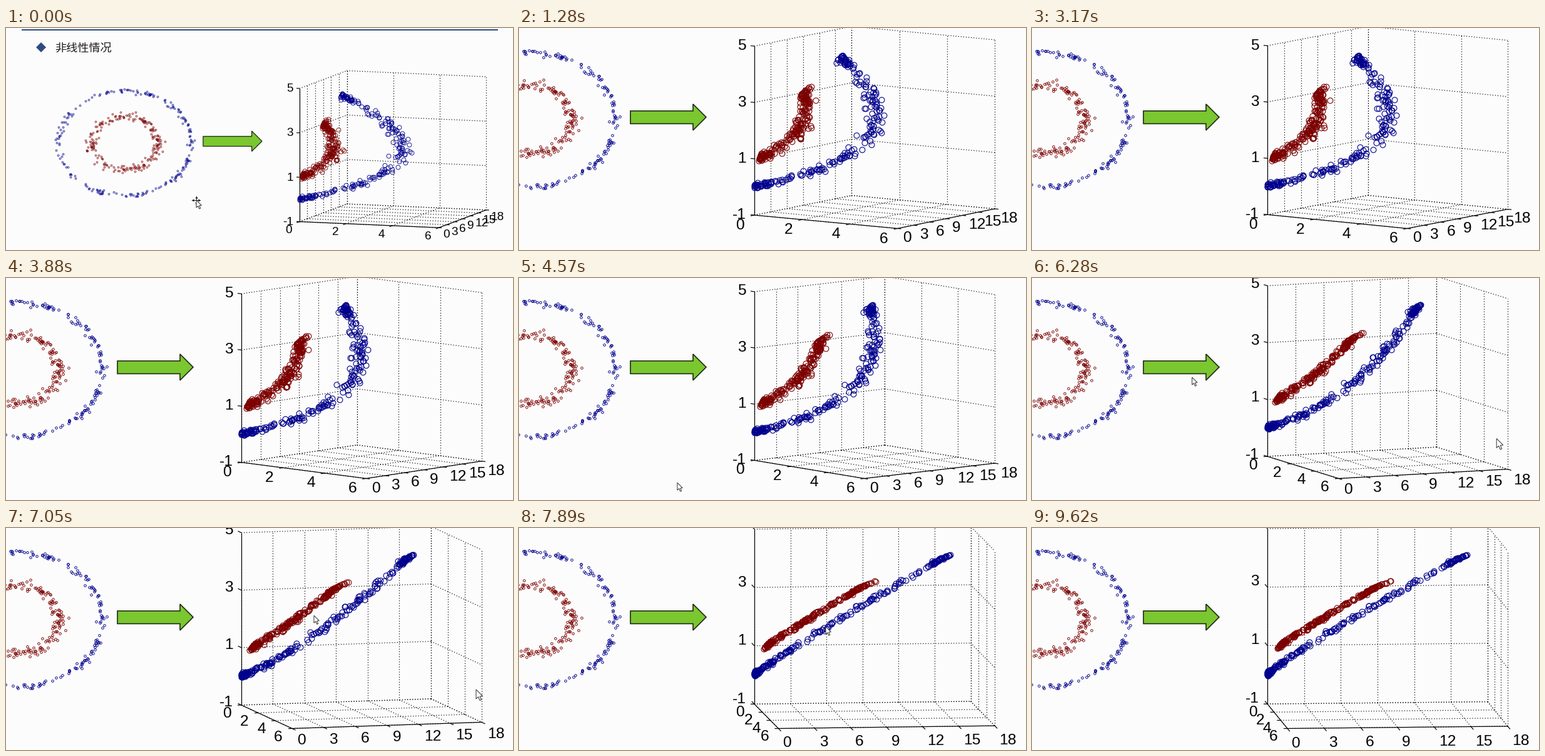
Animation of 810x356 px, one loop 9690 ms. Source, as a matplotlib script:

```python
import numpy as np
import matplotlib.pyplot as plt
from matplotlib.animation import FuncAnimation
from matplotlib.collections import LineCollection
from matplotlib.patches import Polygon
from matplotlib.transforms import Affine2D

W, H, DPI = 810, 356, 100
LOOP, STEP = 9690, 30
PX = 72 / DPI                      # points per pixel
WIDE = 1 / 1.287                   # camera scale before the zoom
FOCUS = np.array([792, 315.7])     # fixed point of the zoom
LEFT, SPAN = 376, 384              # plot box on the stage
BOTTOM, TALL = 321.5, 324
TILT = np.tan(np.radians(8))
NAVY, MAROON = "#00008c", "#7c0000"

fig = plt.figure(figsize=(W / DPI, H / DPI), dpi=DPI, facecolor="#fcfcfc")
ax = fig.add_axes([0, 0, 1, 1])
ax.set(xlim=(0, W), ylim=(H, 0))
ax.axis("off")

cam = Affine2D()
view = cam + ax.transData


def wide(points):
    """Scene position of points given on the stage before the zoom."""
    return FOCUS + (np.array(points) - FOCUS) / WIDE


# Heading
rule = wide([(26, 3), (785, 3)])
ax.plot(*rule.T, color="#2c4a7a", lw=2 * PX, transform=view)
diamond = wide([(48, 31), (56, 23), (64, 31), (56, 39)])
ax.add_patch(Polygon(diamond, fc="#2f4a80", ec="none", transform=view))
heading = ax.text(*wide((78, 31)), "非线性情况", family="Noto Sans CJK JP",
                  color="#201a1c", va="center_baseline", transform=view)

# Block arrow
arrow = Polygon([(178, 133), (278, 133), (278, 122), (299, 143), (278, 164),
                 (278, 153.5), (178, 153.5)], fc="#7ac730", ec="#1c2410",
                joinstyle="miter", transform=view)
ax.add_patch(arrow)


# Two noisy rings, lifted to (x², u², u)
def ring(rng, radius, noise, n):
    a = rng.uniform(0, 2 * np.pi, n)
    r = radius + rng.normal(0, noise, n)
    return r * np.cos(a), 2 + r * np.sin(a)


def markers(color, z):
    return ax.plot([], [], "o", mfc="none", mec=color, transform=view,
                   zorder=z)[0]


rng = np.random.default_rng(12)
groups = []
for radius, noise, color in ((1.98, .045, NAVY), (1, .085, MAROON)):
    x, u = ring(rng, radius, noise, 220)
    flat = markers(color, 3)
    flat.set_data(17 + 69 * x, 147 - 54.5 * (u - 2))
    groups.append((flat, markers(color, 5), np.array([x**2, u**2, u])))

# Plot box
grid = LineCollection([], colors="black", linestyles=[(0, (1, 2.4))],
                      lw=1.2 * PX, transform=view, zorder=2)
frame = LineCollection([], colors="black", lw=1.2 * PX, transform=view,
                       zorder=2.5)
ax.add_collection(grid)
ax.add_collection(frame)
XT, YT, ZT = range(0, 7, 2), range(0, 19, 3), range(-1, 6, 2)


def labels(values, ha):
    return [ax.text(0, 0, str(v), family="Liberation Sans", color="black",
                    ha=ha, va="center_baseline", transform=view, zorder=4)
            for v in values]


xlab, ylab, zlab = labels(XT, "center"), labels(YT, "left"), labels(ZT, "right")


def projector(az):
    s, c = np.sin(np.radians(az)), np.cos(np.radians(az))
    h = TALL / (1 + TILT * (s + c))
    ex = np.array([SPAN * c / (s + c), TILT * h * s])
    ey = np.array([SPAN * s / (s + c), -TILT * h * c])
    origin = np.array([LEFT, BOTTOM - ex[1]])

    def project(x, y, z):
        a, b, e = np.asarray(x) / 6, np.asarray(y) / 18, (np.asarray(z) + 1) / 6
        return np.array([origin[0] + a * ex[0] + b * ey[0],
                         origin[1] + a * ex[1] + b * ey[1] - e * h])

    return project, ex / np.hypot(*ex), ey / np.hypot(*ey)


def draw_box(az):
    project, dx, dy = projector(az)

    def seg(p, q):
        return [project(*p), project(*q)]

    def tick(p, d):
        start = project(*p)
        return [start, start + 6 * d]

    grid.set_segments(
        [seg((x, 18, -1), (x, 18, 5)) for x in XT]
        + [seg((x, 0, -1), (x, 18, -1)) for x in XT]
        + [seg((0, y, -1), (0, y, 5)) for y in YT]
        + [seg((0, y, -1), (6, y, -1)) for y in YT]
        + [seg((0, 0, z), (0, 18, z)) for z in ZT]
        + [seg((0, 18, z), (6, 18, z)) for z in ZT])
    frame.set_segments(
        [seg((0, 0, -1), (0, 0, 5)), seg((0, 0, -1), (6, 0, -1)),
         seg((6, 0, -1), (6, 18, -1))]
        + [tick((x, 0, -1), -dy) for x in XT]
        + [tick((6, y, -1), dx) for y in YT]
        + [tick((0, 0, z), -dx) for z in ZT])

    for v, lab in zip(XT, xlab):
        lab.set_position(project(v, 0, -1) + (-22, 17 - .07 * az))
    for v, lab in zip(YT, ylab):
        lab.set_position(project(6, v, -1)
                         + (3 + 6.5 * dx[0], 12 + 12.5 * dx[1]))
    for v, lab in zip(ZT, zlab):
        lab.set_position(project(0, 0, v) + (-13, -1 - 13 * dx[1]))
    for _, lifted, data in groups:
        lifted.set_data(*project(*data))


# Mouse pointers
POINTER = np.array([(0, 0), (0, 12), (2.8, 9.4), (4.8, 14), (6.8, 13.2),
                    (4.8, 8.8), (8.4, 8.4)])


def pointer():
    p = Polygon(POINTER, fc="white", ec="#333333", lw=PX, zorder=8)
    return ax.add_patch(p)


hand, rest = pointer(), pointer()
move = []
for x, y, m in ((298, 276, "<"), (309, 276, ">"), (303.5, 270.5, "^"),
                (303.5, 281.5, "v")):
    move += ax.plot([303.5, x], [276, y], color="#222222", lw=PX, zorder=7)
    move += ax.plot(x, y, m, color="#222222", ms=3, mew=0, zorder=7)


def place(p, t, times, xs, ys, size=1):
    p.set_visible(times[0] <= t < times[-1])
    p.set_xy(POINTER * size + (np.interp(t, times, xs), np.interp(t, times, ys)))


def draw_pointers(t):
    for m in move:
        m.set_visible(t < 100)
    if t < 100:
        place(hand, t, (0, 100), (304, 304), (276, 276))
    else:
        place(hand, t, (4400, 4570, 5580, 7050, 7890, 8000),
              (262, 254, 38, 492, 490, 490), (356, 329, 177, 140, 158, 160))
    place(rest, t, (5500, 5580, 7050, 7600), (733, 734, 751, 751),
          (256, 256, 259, 259), 1.25)


def draw_camera(s):
    cam.clear().translate(*-FOCUS).scale(s).translate(*FOCUS)
    heading.set_fontsize(18.2 * PX * s / WIDE)
    arrow.set_linewidth(1.6 * PX * s)
    for lab in xlab + ylab + zlab:
        lab.set_fontsize(24.5 * PX * s)
    for flat, lifted, _ in groups:
        flat.set(markersize=3.6 * PX * s, markeredgewidth=.9 * PX * s)
        lifted.set(markersize=8.8 * PX * s, markeredgewidth=1.1 * PX * s)


def update(k):
    t = k * STEP + STEP / 2
    zoom = np.clip((t - 660) // 73 + 1, 0, 4) / 4
    turn = max(0, (t - 3000) // 77)
    az = min(18.8 + 15.4 * zoom + .785 * turn, 84.8)
    draw_camera(WIDE + (1 - WIDE) * zoom)
    draw_box(az)
    draw_pointers(t)
    return []


anim = FuncAnimation(fig, update, frames=LOOP // STEP, interval=STEP,
                     repeat=True, blit=False)
plt.show()
```
